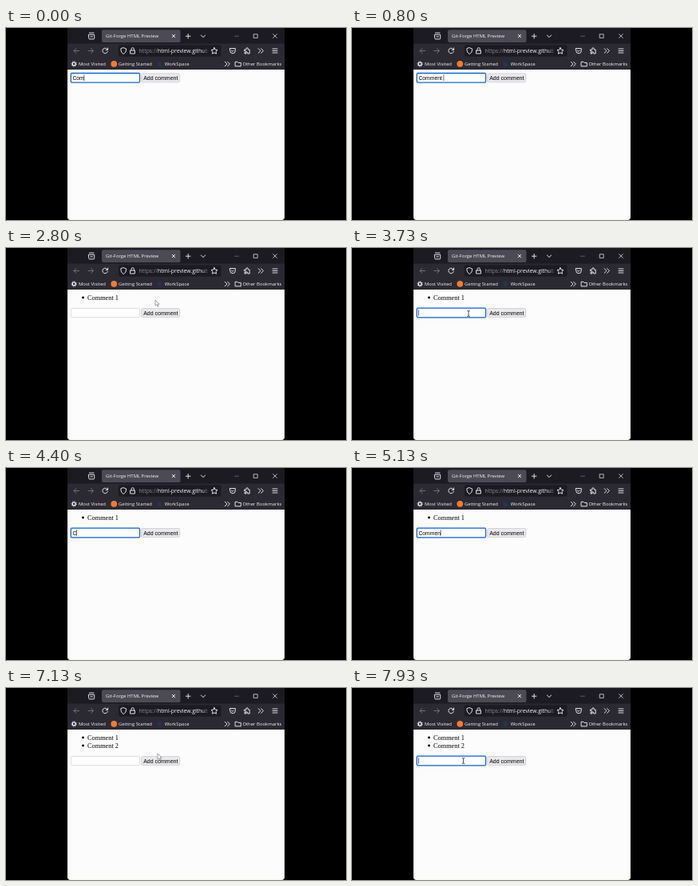
An HTML page that plays this animation: 426 by 240 pixels, repeating every 8 s.

```html
<!DOCTYPE html>
<html lang="en">
<head>
<meta charset="utf-8">
<title>Comment form</title>
<style>
  html, body { margin: 0; width: 100%; height: 100%; overflow: hidden; background: #000; }
  svg { display: block; width: 100%; height: 100%; }
  text { white-space: pre; }
  .ui { font-family: "Open Sans", "Noto Sans", sans-serif; font-size: 5.95px; fill: #f4f4f8; }
  .url { font-size: 6.85px; }
  .form { font-family: "Liberation Sans", Arial, sans-serif; font-size: 7px; fill: #000; }
  .list { font-family: "Liberation Serif", Times, serif; font-size: 8.3px; fill: #000; }
  #value { font-size: 6.8px; }
  .icon { fill: none; stroke: #f4f4f8; stroke-width: .9; stroke-linecap: round; stroke-linejoin: round; }
  .thin { stroke-width: .7; }
  .dim { stroke: #77767f; }
</style>
</head>
<body>
<svg viewBox="0 0 426 240">
  <defs>
    <clipPath id="window"><path d="M77 0H349V236Q349 240 345 240H81Q77 240 77 236Z"/></clipPath>
    <linearGradient id="fade">
      <stop offset="0" stop-color="#1c1b22" stop-opacity="0"/>
      <stop offset=".8" stop-color="#1c1b22"/>
    </linearGradient>
  </defs>
  <rect width="426" height="240"/>
  <g clip-path="url(#window)">
    <rect x="77" width="272" height="240" fill="#fcfcfd"/>
    <path d="M77.5 52V236Q77.5 239.5 81 239.5H345Q348.5 239.5 348.5 236V52" fill="none" stroke="#f8f8e2"/>
    <rect x="77" width="272" height="20" fill="#1c1b22"/>
    <rect x="77" y="19.5" width="272" height="32.5" fill="#2b2a33"/>
    <rect x="120" y="2.3" width="98.5" height="15.6" rx="2" fill="#4c4b55"/>
    <rect x="141" y="21.3" width="128.5" height="14.4" rx="2" fill="#1c1b22"/>

    <g class="icon">
      <path d="M103.7 8.3H110.7V12.9Q110.7 13.9 109.7 13.9H104.7Q103.700 13.9 103.7 12.9ZM104.4 6.1H110M105.8 10.9H108.6"/>
      <path d="M208.2 8.2L211.8 11.8M211.8 8.2L208.2 11.8M225.4 10.2H231M228.2 7.4V13M244.3 9L247 11.6L249.7 9"/>
      <path class="thin" d="M334.6 7.6L339.4 12.4M339.4 7.6L334.6 12.4M310.6 7.8H315.2V12.4H310.6Z"/>
      <path class="thin dim" d="M286.5 10.2H291.5"/>
      <path class="dim" d="M91.5 28.5H85.2M88 25.5L85 28.5L88 31.5M103 28.5H109.3M106.5 25.5L109.5 28.5L106.5 31.5"/>
      <path d="M127.2 27A3.3 3.3 0 1 0 127.4 29.4M127.6 25V27.4H125.2"/>
      <path d="M147.3 24.7L150.7 26Q151 30.6 147.3 32.6Q143.6 30.6 143.9 26Z"/>
      <path d="M156 28H161.4V32H156ZM157 28V26.4A1.7 1.7 0 0 1 160.4 26.4V28"/>
      <path d="M261 24.6L262.2 27.1L265 27.5L263 29.4L263.5 32.2L261 30.9L258.5 32.2L259 29.4L257 27.5L259.8 27.1Z"/>
      <path d="M280.7 25.5H287.3V28.5A3.3 3.3 0 0 1 280.7 28.5ZM282.4 27.8L284 29.4L285.6 27.8"/>
      <path d="M299 27H301V25.8A1.1 1.1 0 0 1 303.2 25.8V27H305.2V32H302.8V30.9A.9 .9 0 0 0 301 30.9V32H299V30.3H300A.8 .8 0 0 0 300 28.7H299Z"/>
      <path d="M316.2 25.7L319 28.5L316.2 31.3M319.7 25.7L322.5 28.5L319.7 31.3M334 26H340M334 28.5H340M334 31H340"/>
      <path d="M274.2 42.2L277 45L274.2 47.8M277.6 42.2L280.4 45L277.6 47.8"/>
      <path d="M287.5 42.3H290L291 43.4H294.3V47.8H287.5Z"/>
      <circle cx="85.2" cy="44.9" r="2" stroke-width="1.3"/>
      <circle cx="85.2" cy="44.9" r="3.2" stroke-dasharray="1 1.513" stroke-linecap="butt"/>
    </g>
    <circle cx="135.3" cy="44.8" r="3.9" fill="#f47b30"/>
    <rect x="189.5" y="42.3" width="5.2" height="5.2" fill="#233454"/>

    <g class="ui">
      <text x="125" y="12.3">Git-Forge HTML Preview</text>
      <text class="url" x="166.6" y="30.9"><tspan fill="#8f8e99">https://</tspan>html-preview.github</text>
      <text x="91" y="47.1">Most Visited</text>
      <text x="141" y="47.1">Getting Started</text>
      <text x="198.7" y="47.1">WorkSpace</text>
      <text x="296.4" y="47.1">Other Bookmarks</text>
    </g>
    <rect x="246" y="23" width="10" height="11" fill="url(#fade)"/>

    <g id="list" class="list">
      <g><circle cx="96.5" cy="62" r="1.4"/><text x="102" y="64.6">Comment 1</text></g>
      <g><circle cx="96.5" cy="72" r="1.4"/><text x="102" y="74.6">Comment 2</text></g>
    </g>

    <g id="form" class="form">
      <rect id="halo" x="80.4" y="-6.7" width="88" height="13.4" rx="2" fill="#8ab6f0"/>
      <rect id="field" x="81.4" y="-5.7" width="86" height="11.4" rx="1.2" fill="#fff"/>
      <text id="value" x="83.4" y="2.6"></text>
      <path id="caret" d="M0 -3.8V3.8" stroke="#000" stroke-width=".6"/>
      <rect id="button" x="169.7" y="-5.5" width="48" height="11" rx="1.8" stroke="#c0c0cc" stroke-width=".6"/>
      <text x="172.2" y="2.6">Add comment</text>
    </g>

    <path id="arrow" d="M0 0V7.2L1.7 5.7L2.9 8.3L4.1 7.8L2.9 5.2H5.1Z" fill="#fff" stroke="#666" stroke-width=".6"/>
    <path id="beam" d="M-1.7 -3.6Q0 -3.6 0 -2.7Q0 -3.6 1.7 -3.6M0 -2.9V2.9M-1.7 3.6Q0 3.6 0 2.7Q0 3.6 1.7 3.6" fill="none" stroke="#222" stroke-width=".8"/>
  </g>
</svg>
<script>
const LOOP = 8000;
const $ = id => document.getElementById(id);
const [list, form, halo, field, value, caret, button, arrow, beam] =
  ["list", "form", "halo", "field", "value", "caret", "button", "arrow", "beam"].map($);

const adds = [2270, 6950];
const formY = [62.3, 81, 91];

// Each session: focus time, blur time, text, and the time of each key
const sessions = [
  { from: 0, to: 2270, text: "Comment 1", keys: [0, 0, 0, 100, 220, 380, 500, 640, 950] },
  { from: 3550, to: 6950, text: "Comment 2", keys: [4330, 4500, 4650, 4780, 4900, 5050, 5200, 5300, 5380] },
  { from: 7700, to: LOOP, text: "", keys: [] }
];

// Pointer stops: time, x, y
const trails = [
  { from: 1700, to: 4330, stops: [[1700, 146, 72], [2130, 187, 65], [2950, 187, 65], [3450, 146, 82]] },
  { from: 5750, to: LOOP, stops: [[5750, 146, 82], [6300, 192, 91], [6450, 192, 90], [6780, 190, 82], [7150, 190, 82], [7620, 139.5, 91]] }
];

const show = (el, on) => el.setAttribute("visibility", on ? "visible" : "hidden");
const place = (el, x, y) => el.setAttribute("transform", `translate(${x} ${y})`);
const during = t => span => t >= span.from && t < span.to;

function pointerAt(t) {
  const trail = trails.find(during(t));
  if (!trail) return null;
  const { stops } = trail;
  const next = stops.findIndex(s => s[0] > t);
  if (next < 0) return stops[stops.length - 1].slice(1);
  const [t0, x0, y0] = stops[next - 1], [t1, x1, y1] = stops[next];
  const u = (t - t0) / (t1 - t0), k = u * u * (3 - 2 * u);
  return [x0 + (x1 - x0) * k, y0 + (y1 - y0) * k];
}

function draw(t) {
  const count = adds.filter(a => t >= a).length;
  const y = formY[count];
  [...list.children].forEach((item, i) => show(item, i < count));
  place(form, 0, y);

  const session = sessions.find(during(t));
  const typed = session ? session.keys.filter(k => k <= t) : [];
  value.textContent = session ? session.text.slice(0, typed.length) : "";
  show(halo, session);
  field.setAttribute("stroke", session ? "#1766c8" : "#c4c4ca");
  field.setAttribute("stroke-width", session ? 1.1 : .6);
  const lastInput = session ? Math.max(session.from, ...typed) : 0;
  show(caret, session && (t - lastInput) % 1000 < 500);
  place(caret, 83.5 + (typed.length ? value.getComputedTextLength() : 0), 0);

  const p = pointerAt(t);
  const inside = (left, right) => p && p[0] > left && p[0] < right && Math.abs(p[1] - y) < 5.7;
  const overField = inside(81, 168);
  const pressed = adds.some(a => t >= a - 90 && t < a);
  button.setAttribute("fill", pressed ? "#b1b1b9" : inside(169.5, 218) ? "#d0d0d7" : "#e9e9ed");
  show(arrow, p && !overField);
  show(beam, overField);
  if (p) {
    place(arrow, ...p);
    place(beam, ...p);
  }
}

function tick() {
  draw(performance.now() % LOOP);
  requestAnimationFrame(tick);
}
tick();
</script>
</body>
</html>
```
